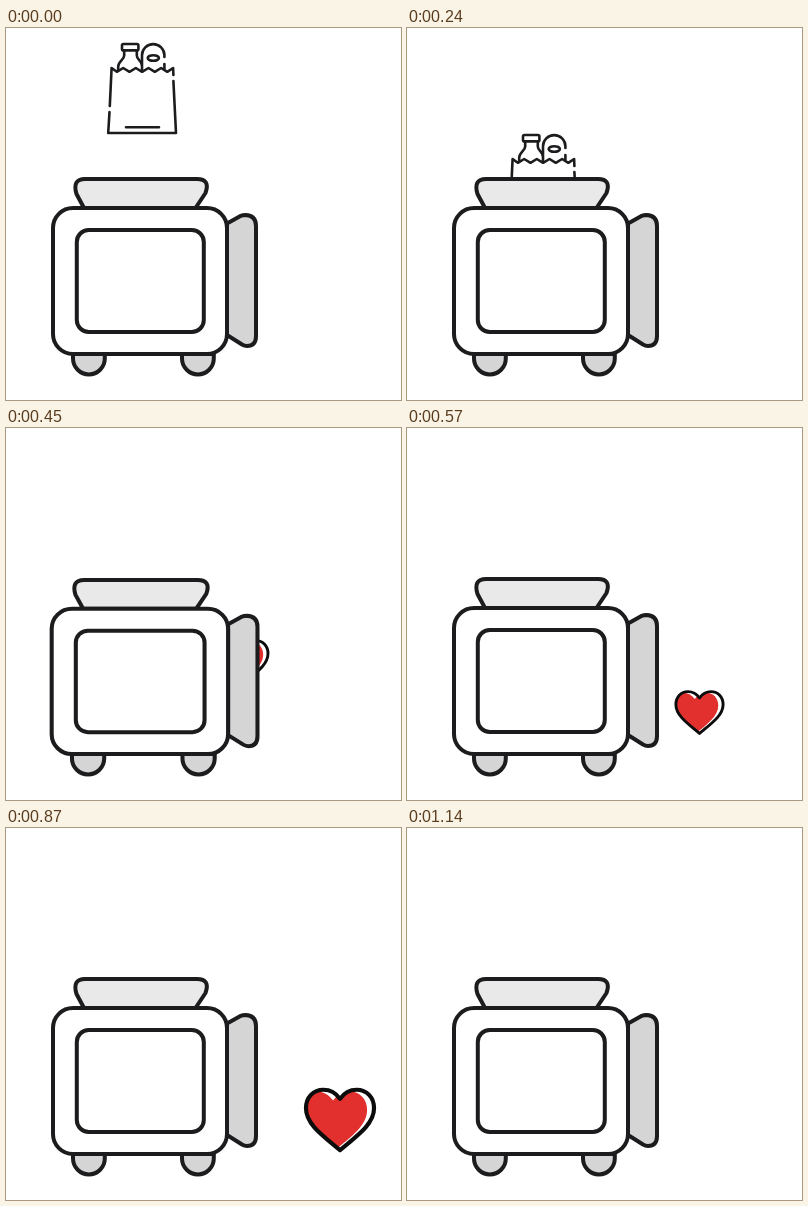
An HTML page for the animation above (1200 ms loop, 395 by 372 pixels).

```html
<!DOCTYPE html>
<html lang="en">
<head>
<meta charset="utf-8">
<title>Groceries to heart</title>
<style>
  html, body { margin: 0; width: 100%; height: 100%; overflow: hidden; background: #fff; }
  svg { display: block; width: 100%; height: 100%; }
  .line { fill: none; stroke: #1c1c1e; stroke-linecap: round; stroke-linejoin: round; }
</style>
</head>
<body>
<svg viewBox="0 0 395 372">
  <defs>
    <path id="shape" d="M0-14.5C-3-18.8-7-20.8-11.5-20.8C-18.5-20.8-23.6-15.5-23.6-8C-23.6 3-12 11 0 21C12 11 23.6 3 23.6-8C23.6-15.5 18.5-20.8 11.5-20.8C7-20.8 3-18.8 0-14.5Z"/>
    <clipPath id="inside"><use href="#shape"/></clipPath>
  </defs>

  <g id="bag" class="line" stroke-width="2.6">
    <path d="M103.8 78L105.6 40l5.2 3.8 6.4-3.8 6.3 3.8 6.3-3.8 6.3 3.8 6.4-3.8 6.3 3.8 6.3-3.8 6.2 3.8 5.8-3.8.3 7"/>
    <path d="M103.5 84L102.2 105H170L167.4 53M120 99.3H153"/>
    <rect x="116" y="16" width="16.4" height="6.4" rx="1.5"/>
    <path d="M118.2 22.5v5c0 4-6 6-6 11v4M130.8 22.5v5c0 4 4.6 5 4.9 9"/>
    <path d="M136 42V27.3a11.2 11.2 0 0 1 22.4 0V29M158.4 36v5"/>
    <ellipse cx="147.3" cy="30" rx="5.6" ry="2.8"/>
  </g>

  <g id="heart">
    <use href="#shape" fill="#fff"/>
    <g clip-path="url(#inside)"><use href="#shape" x="-4.8" y="1.2" fill="#e1302d"/></g>
    <use href="#shape" fill="none" stroke="#0c0c0c" stroke-width="2.9" stroke-linejoin="round"/>
  </g>

  <g id="machine" class="line" stroke-width="4">
    <g fill="#d5d5d5">
      <path d="M67 326v4.5a15.9 15.9 0 0 0 31.8 0V326Z"/>
      <path d="M176 326v4.5a15.9 15.9 0 0 0 31.8 0V326Z"/>
      <path d="M221 195.5L234 188.2Q237 187 239.5 187Q250 187.5 250 198V308Q250 318 241 318Q238.500 318 236 316.500L221 307Z"/>
    </g>
    <path fill="#e9e9e9" d="M78 180L70.500 166Q66 151 79 151H191Q204.500 151 199.500 165L189.500 180Z"/>
    <rect fill="#fff" x="47" y="180" width="174" height="146" rx="20"/>
    <rect fill="#fff" x="70.800" y="202" width="127" height="102" rx="12"/>
  </g>
</svg>
<script>
const LOOP = 1200, STEP = 30;
const [bag, heart, machine] = ['bag', 'heart', 'machine'].map(id => document.getElementById(id));

const span = (t, a, b) => Math.min(1, Math.max(0, (t - a) / (b - a)));
const sine = u => (1 - Math.cos(Math.PI * u)) / 2;
const mix = (a, b, u) => a + (b - a) * u;
const show = (el, on) => el.setAttribute('visibility', on ? 'visible' : 'hidden');
const place = (el, value) => el.setAttribute('transform', value);

function draw(t) {
  // The bag drops into the hopper.
  show(bag, t < 360);
  place(bag, `translate(0 ${91 * Math.pow(t / 240, 1.7)})`);

  // The machine squashes on its feet and recovers.
  const squash = sine(span(t, 240, 360)) - sine(span(t, 360, 480));
  const sx = 1 + 0.094 * squash, sy = 1 - 0.033 * squash;
  place(machine, `translate(142.7 347) scale(${sx} ${sy}) translate(-142.7 -347)`);

  // The heart slides out, then rises and grows.
  const out = sine(span(t, 360, 720)), up = span(t, 720, 960);
  const x = mix(222, 334, out);
  const y = mix(218, 323.5, out) - 81.3 * up * up;
  const size = 1 + 0.92 * Math.pow(up, 1.56);
  show(heart, t >= 390 && t < 1140);
  place(heart, `translate(${x} ${y}) scale(${size})`);
}

const start = performance.now();
function tick() {
  const t = (performance.now() - start) % LOOP;
  draw(Math.floor(t / STEP) * STEP);
  requestAnimationFrame(tick);
}
tick();
</script>
</body>
</html>
```
